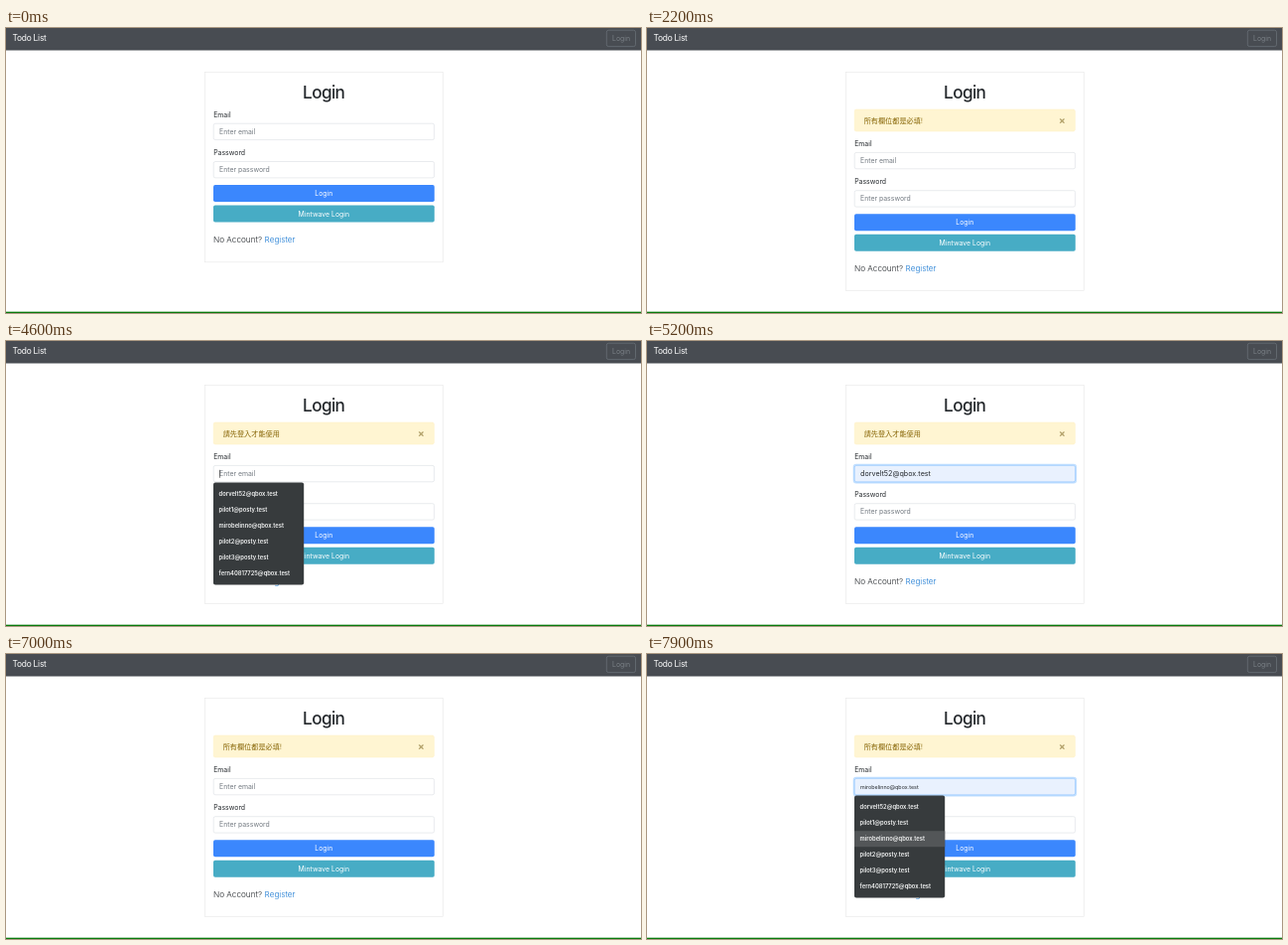
Recreate the animation shown at these times as an HTML page. Size 640 px wide and 287 px high, loop 8 s.

```html
<!DOCTYPE html>
<html lang="zh-Hant">
<head>
<meta charset="utf-8">
<style>
  html, body { margin: 0; width: 100%; height: 100%; overflow: hidden; background: #fff; }
  svg { display: block; width: 640px; height: 287px; }
  text { font: 6.9px Inter, "Noto Sans CJK TC", "Noto Sans CJK", sans-serif; fill: #24282c; white-space: pre; }
  .mid { text-anchor: middle; }
  .brand { font-size: 8.4px; letter-spacing: -.22px; fill: #fff; }
  .title { font-size: 17.2px; font-weight: 500; letter-spacing: -.65px; }
  .hint { fill: #737a81; }
  .btn { fill: #fff; }
  .lead { font-size: 8.2px; font-weight: 300; }
  .note { font: 7.15px "Noto Sans CJK TC", "Noto Sans CJK", sans-serif; fill: #856404; }
  .close { font-size: 10px; font-weight: 700; fill: #b09f67; }
  .menu text { font-size: 5.8px; font-weight: 600; fill: #f1f2f2; }
  .input { fill: #fff; stroke: #dadee2; stroke-width: .6; }
</style>
</head>
<body>
<svg viewBox="0 0 640 287">
  <rect width="640" height="22.5" fill="#484c52"/>
  <text class="brand" x="6.4" y="13.3">Todo List</text>
  <rect x="605.3" y="2.2" width="29.2" height="16.4" rx="2" fill="none" stroke="#6d747b" stroke-width=".7"/>
  <text class="mid" x="620" y="12.9" style="fill:#7b8187">Login</text>
  <rect y="285.7" width="640" height="1.3" fill="#087a0c"/>

  <rect id="card" x="200.5" y="44.3" width="240" height="191.5" fill="#fff" stroke="#e7e7e7" stroke-width=".6"/>
  <text class="title mid" x="320.2" y="70.6">Login</text>

  <g id="alert">
    <rect x="209.2" y="82" width="222.2" height="22" rx="1.8" fill="#fff5d2" stroke="#ffefc0" stroke-width=".5"/>
    <text id="note" class="note" x="218.7" y="95.7"></text>
    <text class="close mid" x="418.5" y="97">×</text>
  </g>

  <g id="form">
    <text x="209.2" y="89.9">Email</text>
    <rect id="ring" x="208.4" y="95.2" width="224" height="18.3" rx="2.5" fill="none" stroke="#bfdeff" stroke-width="1.4"/>
    <rect id="email" class="input" x="209.2" y="96.2" width="222.4" height="16.4" rx="1.8"/>
    <text id="value" x="215" y="106.9"></text>
    <rect id="caret" x="215" y="100.6" width=".6" height="8" fill="#222"/>

    <text x="209.2" y="127.9">Password</text>
    <rect class="input" x="209.2" y="134.5" width="222.4" height="16.4" rx="1.8"/>
    <text class="hint" x="215" y="145.2">Enter password</text>

    <rect id="focus" x="208.4" y="157.4" width="224" height="18.4" rx="2.5" fill="none" stroke="#bfdeff" stroke-width="1.4"/>
    <rect id="login" x="209" y="158.1" width="222.8" height="17" rx="1.8"/>
    <text class="btn mid" x="320.3" y="169.1">Login</text>
    <rect x="209" y="178.5" width="222.8" height="17" rx="1.8" fill="#47acc5"/>
    <text class="btn mid" x="320.3" y="189.5">Mintwave Login</text>
    <text class="lead" x="209" y="215.5">No Account?</text>
    <text class="lead" x="260.6" y="215.5" style="fill:#1677d2">Register</text>
  </g>

  <g id="menu" class="menu">
    <rect x="209" y="142.4" width="91.2" height="103" rx="2" fill="#373b3d"/>
    <rect id="row" x="209" width="91.2" height="16" fill="#535658"/>
  </g>
</svg>
<script>
const $ = id => document.getElementById(id);
const set = (id, attr, value) => $(id).setAttribute(attr, value);
const show = (id, on) => set(id, 'opacity', +on);

const LOOP = 8000, FADE = 150, SHIFT = 29.2;
const mails = ['dorvelt52@qbox.test', 'pilot1@posty.test', 'mirobelinno@qbox.test',
  'pilot2@posty.test', 'pilot3@posty.test', 'fern40817725@qbox.test'];
const required = '所有欄位都是必填!', signIn = '請先登入才能使用';

mails.forEach((mail, i) => {
  const text = document.createElementNS('http://www.w3.org/2000/svg', 'text');
  text.setAttribute('x', 214.6);
  text.setAttribute('y', 156.3 + 16 * i);
  text.textContent = mail;
  $('menu').append(text);
});

const within = (t, a, b) => t >= a && t < b;
const ramp = (t, start) => Math.min(1, Math.max(0, (t - start) / FADE));
// Fades in at a, out at b
const pulse = (t, a, b) => ramp(t, a) - ramp(t, b);
const mix = (from, to, k) => `rgb(${from.map((c, i) => Math.round(c + (to[i] - c) * k))})`;

function hoveredRow(t) {
  if (within(t, 5000, 5200)) return 0;
  return t >= 7700 ? Math.min(2, Math.floor((t - 7700) / 100)) : -1;
}

function draw(t) {
  const alerted = t >= 2000;
  show('alert', alerted);
  set('form', 'transform', `translate(0 ${alerted ? SHIFT : 0})`);
  set('card', 'height', alerted ? 220.3 : 191.5);
  $('note').textContent = within(t, 3500, 6000) ? signIn : required;

  const open = within(t, 4600, 5200) || t >= 7200;
  const row = hoveredRow(t);
  show('menu', open);
  show('row', row >= 0);
  set('row', 'y', 178.2 + 16 * (row - 2));

  const chosen = within(t, 5200, 6000);
  const filled = chosen || row >= 0;
  const value = $('value');
  value.textContent = filled ? mails[chosen ? 0 : row] : 'Enter email';
  value.setAttribute('class', filled ? '' : 'hint');
  value.style.fontSize = row >= 0 ? '5.4px' : chosen ? '7.2px' : '';

  const focus = t < 6000 ? pulse(t, 4600, 5800) : ramp(t, 7200);
  show('ring', 0);
  set('ring', 'opacity', focus);
  $('email').style.stroke = mix([218, 222, 226], [128, 189, 255], focus);
  $('email').style.fill = filled ? '#e9f1fe' : '#fff';
  show('caret', open && !filled);

  const hover = t < 2000 ? ramp(t, 1600) : pulse(t, 5600, 6500);
  set('login', 'fill', mix([59, 135, 253], [50, 118, 219], hover));
  set('focus', 'opacity', t < 2000 ? ramp(t, 1750) : within(t, 5800, 6000) ? ramp(t, 5800) : 0);
}

function tick(now) {
  draw(now % LOOP);
  requestAnimationFrame(tick);
}
draw(0);
requestAnimationFrame(tick);
</script>
</body>
</html>
```
